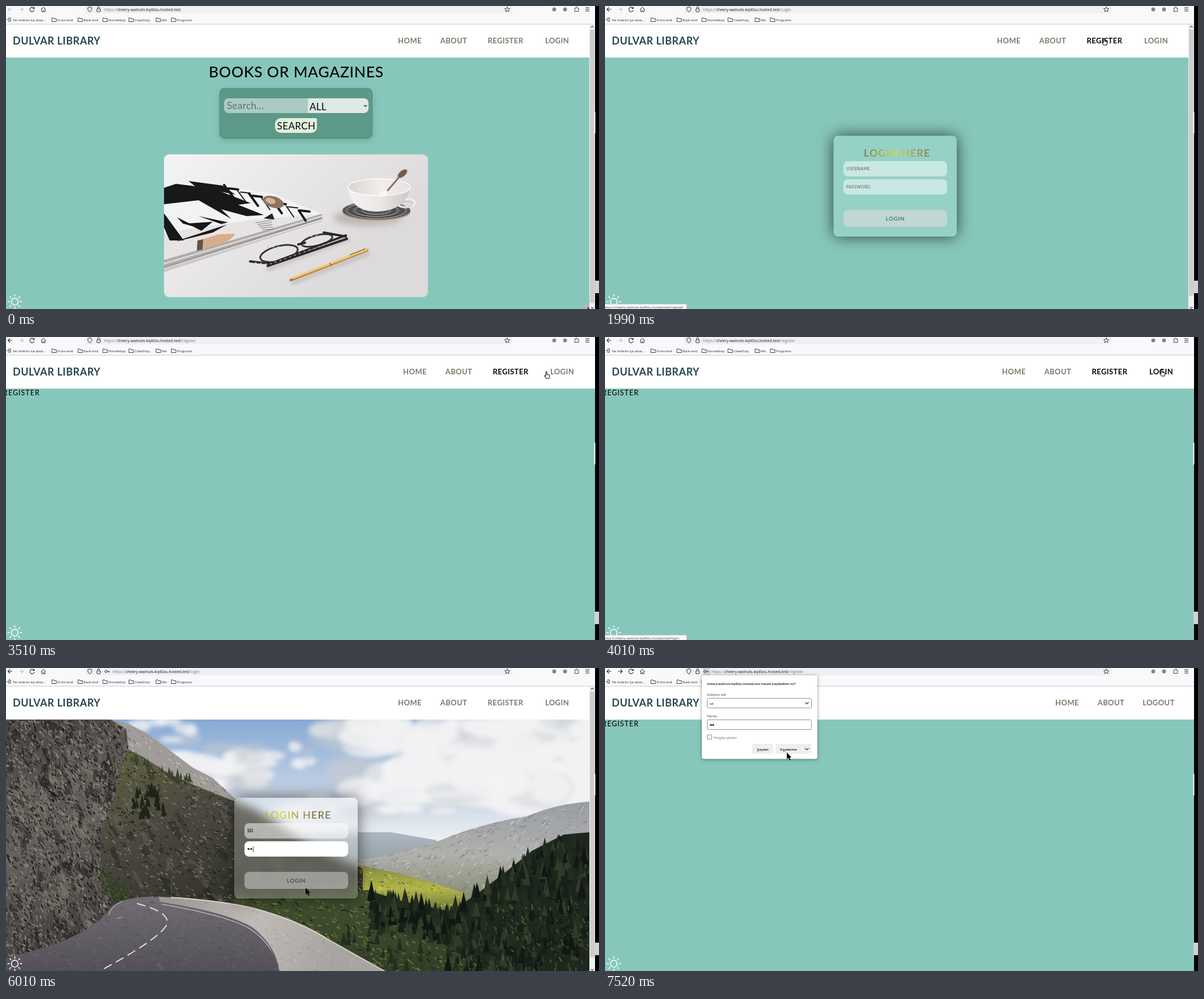
An HTML page with a canvas that plays this animation: 1047x535 px, repeating every 8000 ms.

```html
<!DOCTYPE html>
<html lang="en">
<head>
<meta charset="utf-8">
<title>Library site</title>
<style>
  html, body { margin: 0; width: 100%; height: 100%; overflow: hidden; background: #000; }
  canvas { display: block; }
</style>
</head>
<body>
<canvas id="stage" width="1047" height="535"></canvas>
<script>
const W = 1047, H = 535, LOOP = 8000;
const HOST = 'cheery-walnuts-kq40zu.hosted.test';
const TEAL = '#87c7bb', INK = '#2b2a33';
const stage = document.getElementById('stage').getContext('2d');
let g = stage;

// Each step: start time and the state of the screen from then on.
const steps = [
  [0, { page: 'home', corner: true }],
  [500, { page: 'home', arrow: [700, 89] }],
  [990, { page: 'home', active: 'HOME', hand: [712, 62] }],
  [1480, { page: 'home', active: 'HOME', bare: true, arrow: [830, 72] }],
  [1990, { page: 'login', path: '/Login', active: 'REGISTER', status: '/register', plain: true, hand: [882, 63] }],
  [2500, { page: 'login', path: '/Login', active: 'REGISTER', status: '/register', hand: [882, 63] }],
  [3000, { page: 'login', path: '/Login', active: 'REGISTER', status: '/register', click: [881, 57], hand: [882, 63] }],
  [3510, { page: 'register', path: '/register', active: 'REGISTER', bare: true, hand: [955, 67] }],
  [4010, { page: 'register', path: '/register', active: 'REGISTER LOGIN', status: '/login', bare: true, hand: [984, 63] }],
  [4500, { page: 'login', path: '/login', active: 'LOGIN', arrow: [725, 233] }],
  [5010, { page: 'login', path: '/login', focus: 'user', beam: [528, 290] }],
  [5500, { page: 'login', path: '/login', focus: 'user', user: 'SD', beam: [531, 324] }],
  [6010, { page: 'login', path: '/login', focus: 'pass', user: 'SD', pass: '••', key: true, arrow: [529, 388] }],
  [6510, { page: 'register', path: '/register', bare: true, member: true, key: true, arrow: [525, 377] }],
  [7010, { page: 'register', path: '/register', bare: true, member: true, key: true, popup: true, arrow: [472, 300] }],
  [7520, { page: 'register', path: '/register', bare: true, member: true, key: true, popup: true, arrow: [321, 149] }]
];

function box(x, y, w, h, fill, radius = 0, line) {
  g.beginPath();
  g.roundRect(x, y, w, h, radius);
  if (fill) { g.fillStyle = fill; g.fill(); }
  if (line) { g.strokeStyle = line; g.lineWidth = 1; g.stroke(); }
}
function shape(d, fill) {
  const p = new Path2D(d);
  g.fillStyle = fill;
  g.fill(p);
  return p;
}
function stroke(d, color, width = 1, dash = []) {
  g.strokeStyle = color;
  g.lineWidth = width;
  g.setLineDash(dash);
  g.stroke(new Path2D(d));
  g.setLineDash([]);
}
function oval(x, y, rx, ry, fill, line, width = 1, turn = 0) {
  g.beginPath();
  g.ellipse(x, y, rx, ry, turn, 0, 7);
  if (fill) { g.fillStyle = fill; g.fill(); }
  if (line) { g.strokeStyle = line; g.lineWidth = width; g.stroke(); }
}
function fade(x0, y0, x1, y1, ...colors) {
  const f = g.createLinearGradient(x0, y0, x1, y1);
  colors.forEach((c, i) => f.addColorStop(i / (colors.length - 1), c));
  return f;
}
function text(s, x, y, size, color, { weight = 400, family = 'Lato', gap = 0, align = 'left' } = {}) {
  g.font = `${weight} ${size}px ${family}, sans-serif`;
  g.letterSpacing = gap + 'px';
  g.textAlign = align;
  g.fillStyle = color;
  g.fillText(s, x, y);
  return x + g.measureText(s).width;
}
const ui = (s, x, y, size, color, more) => text(s, x, y, size, color, { family: '"Open Sans"', ...more });

let seed = 7;
const rnd = (a = 0, b = 1) => a + (b - a) * ((seed = seed * 16807 % 2147483647) / 2147483647);

// Paint once into a canvas of its own, kept inside the given frame.
function picture(frame, paint) {
  const c = document.createElement('canvas');
  c.width = W; c.height = H;
  g = c.getContext('2d');
  g.lineCap = 'round';
  g.beginPath();
  g.roundRect(...frame);
  g.clip();
  paint();
  g = stage;
  return c;
}
// Scatter short strokes inside a shape to give it a rough surface.
function rough(p, n, [x0, y0, x1, y1], colors, size, lean = 0.6) {
  g.save();
  g.clip(p);
  for (let i = 0; i < n; i++) {
    const x = rnd(x0, x1), y = rnd(y0, y1), l = rnd(1, size), a = lean + rnd(-0.6, 0.6);
    stroke(`M${x} ${y}l${l * Math.cos(a)} ${l * Math.sin(a)}`, colors[i % colors.length], rnd(0.6, size / 3));
  }
  g.restore();
}
function pine(x, y, h, color) {
  shape(`M${x} ${y - h}l${h * 0.22} ${h}h${-h * 0.44}z`, color);
}
function cloud(x, y, w, h, n) {
  g.filter = 'blur(4px)';
  for (let i = 0; i < n; i++) {
    oval(x + rnd(-w, w), y + rnd(-h, h), rnd(w / 8, w / 3), rnd(h / 5, h / 2), i % 4 ? '#f3f3f4cc' : '#c8ccd266');
  }
  g.filter = 'none';
}

const valley = picture([0, 91, 1030, 444], () => {
  box(0, 91, 1030, 444, fade(0, 91, 0, 300, '#86a9d4', '#b9cbe2', '#eceef0'));
  cloud(330, 175, 130, 36, 32);
  cloud(275, 110, 65, 22, 14);
  cloud(800, 165, 220, 75, 90);
  cloud(950, 120, 130, 40, 40);
  cloud(530, 150, 32, 20, 9);
  cloud(640, 245, 150, 18, 24);

  shape('M470 296L600 290L680 290L760 304V380H470z', fade(0, 290, 0, 360, '#aeb8c4', '#8c9896'));
  let p = shape('M620 340Q720 325 790 295Q860 270 920 262Q970 240 1030 236V440H740L620 380z',
    fade(0, 240, 0, 420, '#9b9ea5', '#b0b0ad', '#7e8667'));
  rough(p, 900, [620, 236, 1030, 420], ['#d3d2cf77', '#74797d77', '#8a907f77'], 9, 2.6);
  p = shape('M600 344Q700 360 810 398V445H600z', fade(0, 350, 0, 430, '#858c44', '#b3b549', '#66723a'));
  rough(p, 350, [600, 344, 810, 445], ['#d0ca58', '#5d6b31', '#8f9843'], 6, 0.3);

  p = shape('M180 91L215 98L250 116L290 146L330 176L365 194L412 238V300H180z', '#a09b98');
  rough(p, 500, [180, 91, 412, 280], ['#c2bdb9', '#7d7976', '#aaa5a1'], 7, 0.8);
  p = shape('M190 130L240 156L290 188L350 214L440 250L545 318L630 354V470H120V150z',
    fade(200, 150, 330, 430, '#5d603f', '#4a4740', '#34342c'));
  rough(p, 130, [160, 150, 620, 440], ['#6f6b6455', '#1d1f1a66'], 40, 0.9);
  rough(p, 3200, [150, 130, 630, 450], ['#858078', '#26281f', '#625f57', '#42452f', '#1d1f1a'], 6);
  rough(new Path2D('M215 148L330 198L450 252L545 318L520 322L420 268L340 228L225 172z'), 420, [210, 145, 545, 322],
    ['#a0a44b', '#6f7a36', '#3c4829'], 6, 0.4);
  rough(new Path2D('M430 335L630 354V450H440z'), 300, [430, 335, 630, 450], ['#68743a', '#8b8880', '#3f4a2c'], 7, 0.4);
  for (let i = 0; i < 45; i++) pine(rnd(222, 280), rnd(220, 268), rnd(8, 22), '#1d2419');
  for (let i = 0; i < 18; i++) { const x = rnd(215, 330); pine(x, 162 + (x - 215) * 0.36, rnd(8, 17), '#38442b'); }

  p = shape('M0 91H185L212 108L216 140L198 190L190 235L165 292L168 350L188 410L165 455L60 500L0 515z',
    fade(0, 91, 200, 480, '#46423f', '#66605c', '#3d3936'));
  rough(p, 190, [0, 91, 216, 510], ['#8b847d55', '#1c1a1977'], 45, 1.1);
  rough(p, 4200, [0, 91, 216, 510], ['#8f8882', '#2b2826', '#625c57', '#1d1b1a', '#756e69'], 7, 1);
  p = shape('M165 350Q195 375 225 398L200 416L170 400z', '#35422599');
  rough(p, 150, [165, 350, 225, 416], ['#56632f', '#222d1c'], 5);

  p = shape('M400 404L640 392L760 432L1030 460V535H430z', fade(0, 395, 0, 535, '#445130', '#313e27'));
  rough(p, 1300, [400, 392, 1030, 535], ['#5d7034', '#1b2418', '#3b4b2c', '#6f7c40'], 8, 0.5);
  p = shape('M1030 290L985 294L930 322L880 362L830 400L785 430L700 412L640 394L650 440L760 480L850 535H1030z', '#1e271d');
  for (let i = 0; i < 520; i++) {
    const x = rnd(640, 1040), left = x < 780;
    const top = left ? 404 + (x - 640) * 0.21 : Math.max(436 - (x - 780) * 0.68, 306);
    pine(x, top + 4 + rnd(0, left ? 55 : 215), rnd(14, 36), ['#171f18', '#232d1f', '#303c28', '#111813'][i % 4]);
  }
  rough(new Path2D('M870 420L1030 400V535H790z'), 420, [790, 400, 1030, 535], ['#4a5c30', '#33432688', '#141b13'], 8, 1.2);
  for (let i = 0; i < 25; i++) pine(rnd(575, 780), rnd(470, 535), rnd(10, 28), '#222e1d');

  p = shape('M205 411Q250 399 292 407Q390 428 430 454Q470 478 488 535H0V512L80 490Q155 463 180 430Q184 419 205 411z',
    fade(0, 405, 0, 535, '#726d73', '#625e65', '#545059'));
  rough(p, 900, [0, 405, 488, 535], ['#7d788055', '#45424855'], 7, 0);
  stroke('M488 535Q468 485 430 460Q390 437 275 417', '#d7d4d2', 1.2);
  stroke('M232 416Q286 430 285 450Q278 475 160 538', '#e3e0df', 2, [14, 10]);
  stroke('M205 412Q185 420 181 438M196 442L204 440', '#cbc8c6', 1);
  p = shape('M270 404L292 405Q390 412 440 425Q515 445 570 480L668 535H482Q475 490 435 459Q390 432 272 414z',
    fade(300, 405, 560, 535, '#9f9994', '#c0bbb6', '#a8a4a0'));
  rough(p, 300, [270, 404, 672, 535], ['#d6d1cb66', '#87817b55'], 7, 0.5);
  stroke('M292 405Q390 412 440 425Q515 445 570 480L668 535', '#d9d5d0', 2);
  stroke('M272 414Q390 432 435 459Q475 490 482 535', '#68636a', 2);
  stroke('M292 370V404', '#595e70', 1);
});

const desk = picture([279, 262, 466, 252, 9], () => {
  box(279, 262, 466, 252, fade(330, 262, 560, 514, '#f3f2f2', '#e7e5e5', '#dcdada'));
  shape('M279 440L558 372V380L279 470z', '#cecaca');
  shape('M279 329L330 309L470 331L558 367L279 452z', '#f4f3f3');
  shape('M279 405L558 367V376L279 462z', '#bfbbbb');
  shape('M279 400L440 377L558 367L279 448z', '#e6e3e3');
  for (let i = 0; i < 4; i++) stroke(`M279 ${451 + i * 4}L558 ${368 + i * 3}`, i % 2 ? '#f6f4f4' : '#928e8e', 1);
  stroke('M279 462L558 375', '#77716f', 1.2);
  const black = '#191818';
  shape('M279 321L300 314L365 322L432 348L410 351L455 369L425 371L380 359L398 376L340 343L279 350z', black);
  shape('M322 309L382 317L405 333L335 319z', black);
  shape('M279 366L314 414H289L279 391z', black);
  shape('M302 373L340 392L312 384zM340 371L392 382L380 385zM320 384L365 381L345 397z', black);
  shape('M316 410L390 386L365 400L300 416z', black);
  for (let i = 0; i < 7; i++) {
    const x = 385 + i * 22, y = 316 + i * 7.5;
    stroke(`M${x} ${y}l${18 - i} ${24 - i}m-10 -18l17 2`, black, i % 2 ? 2 : 4);
  }
  oval(472, 346, 19, 10, '#8e735d', null, 1, 0.3);
  oval(467, 344, 9, 5, '#d3b59a', null, 1, 0.3);
  shape('M340 414L375 403L404 402Q400 414 372 423L342 430z', '#d8ad8d');
  shape('M338 414L348 412L347 430L337 432z', '#625248');
  for (let i = 0; i < 5; i++) stroke(`M${441 + i * 3} ${383 + i * 3}l${27 - i * 2} ${-5 + i}`, '#777', 1);
  shape('M455 375L470 366L474 377z', '#242323');

  g.filter = 'blur(6px)';
  oval(638, 374, 60, 14, '#bcb7b5');
  g.filter = 'none';
  oval(654, 364, 60, 15, '#b99a7e');
  oval(654, 361, 60, 16, '#575557');
  for (let i = 1; i < 6; i++) oval(654, 361, 60 - i * 7, 16 - i * 1.8, null, i % 2 ? '#b5b2b2' : '#353435', 1);
  oval(707, 348, 15, 7, null, '#eeecec', 4, -0.1);
  oval(707, 350, 11, 5, null, '#b5b1b0', 1, -0.1);
  shape('M604 319Q607 362 652 363Q705 363 714 320z', fade(604, 0, 715, 0, '#f4f3f2', '#ebe8e6', '#cac6c3'));
  oval(659, 320, 55, 15, fade(605, 0, 714, 0, '#d8d4d0', '#f0eeeb', '#e6e2df'), '#fffefe', 1.5);
  stroke('M671 329L696 300', '#8b6e5f', 3);
  oval(700, 296, 10, 5, '#705c53', '#a58b7d', 1, -0.7);
  oval(666, 331, 9, 4, '#faf8f6', null, 1, -0.5);

  g.filter = 'blur(3px)';
  stroke('M462 465L604 412M506 489L640 437', '#bbb5b3', 5);
  g.filter = 'none';
  oval(482, 437, 34, 13, '#e5e3e399', '#353131', 3, -0.25);
  oval(549, 414, 28, 9, '#e5e3e399', '#353131', 3, -0.25);
  stroke('M431 451L466 455L600 405M516 421L528 418M462 459L602 411M561 400L600 407', '#29272a', 4);
  stroke('M440 453L465 456L600 408M462 426L495 424M530 409L552 404', '#c9bcad', 1.5, [2, 7]);
  stroke('M504 483L637 431', '#bd8843', 6);
  stroke('M504 481L637 430', '#edca85', 3.5);
  stroke('M501 485L506 482M572 454L574 459M608 439L634 429', '#946a35', 1.5);
});

function folder(x, name) {
  stroke(`M${x} 21h3l1 1.5h4v5h-8z`, INK, 0.9);
  ui(name, x + 10, 26.5, 6, INK);
}

function chrome(s) {
  box(0, 0, 1040, 32, '#f9f9fb');
  box(140, 0, 754, 13, '#f0f0f4', [0, 0, 3, 3]);
  box(0, 31.5, 1040, 1, '#cfcfd3');
  stroke('M11 6H3.5M7 2.5L3.5 6L7 9.5', s.path ? INK : '#c2c2c6', 1.1);
  stroke('M23 6H30.5M27 2.5L30.5 6L27 9.5', s.member ? INK : '#c2c2c6', 1.1);
  stroke('M49.5 4A4 4 0 1 0 50 7M50 1.5V4.5H47', INK, 1.1);
  stroke('M62 6L66 2L70 6M63 5V10H69V5M66 10V7', INK, 1);
  stroke('M144.5 3L148 1.5L151.5 3Q152 8 148 10.5Q144 8 144.5 3z', INK, 1);
  box(160.5, 5, 6, 5, null, 1, INK);
  stroke('M161.5 5V3.5A2 2 0 0 1 165.5 3.5V5', INK, 1);
  if (s.key) {
    if (s.member) box(173, 0, 13, 12.5, '#d4d4d9');
    oval(176.5, 6, 2, 2, null, INK);
    stroke('M178.5 6H183M182 6V8', INK, 1);
  }
  let x = ui('https://', s.key ? 188 : 173, 8.5, 6.9, '#77767e');
  x = ui(HOST, x, 8.5, 6.9, '#15141a');
  ui(s.path || '', x, 8.5, 6.9, '#77767e');
  stroke('M885 1.5L886.3 4.5L889.5 4.8L887.1 7L887.8 10L885 8.3L882.2 10L882.9 7L880.5 4.8L883.7 4.5z', INK, 0.9);
  oval(968, 6, 3.5, 3.5, '#85858c');
  oval(987, 6, 3.5, 3.5, '#85858c');
  stroke('M1004 4H1006V2.5Q1007.5 1 1009 2.5V4H1011V9.5H1004V7.5Q1006 6.5 1004 5.5z', INK, 0.9);
  stroke('M1023 3H1030M1023 6H1030M1023 9H1030', INK, 1);
  stroke('M4 21H8V27H4M1 24H6M4.5 22.5L6 24L4.5 25.5', INK, 0.9);
  ui('Yer imlerini içe aktar...', 12, 26.5, 5.7, INK);
  [[81, 'Front-end'], [127, 'Back-end'], [171, 'Norvekbay'], [217, 'CrewDuty'], [265, 'Me'], [292, 'Programs']]
    .forEach(f => folder(...f));
}

function header(s) {
  box(0, 32.5, 1040, 58.5, '#fff');
  text('DULVAR LIBRARY', 12, 67.5, 18, '#27474f', { weight: 700, gap: 0.5 });
  const links = s.member ? [['HOME', 807], ['ABOUT', 884.5], ['LOGOUT', 968.5]]
    : [['HOME', 713], ['ABOUT', 790.5], ['REGISTER', 882], ['LOGIN', 973]];
  for (const [name, x] of links) {
    const on = (s.active || '').split(' ').includes(name);
    text(name, x + (s.bare ? 9 : 0), 66, 13, on ? '#060606' : '#80776b', { weight: 700, gap: 0.4, align: 'center' });
  }
}

function home(s) {
  g.save();
  if (s.bare) g.translate(4.5, 0);
  text('BOOKS OR MAGAZINES', 512.5, 126, 26.5, '#060606', { weight: 500, gap: 0.7, align: 'center' });
  g.shadowColor = '#0003';
  g.shadowBlur = 12;
  g.shadowOffsetY = 3;
  box(377.5, 145.5, 269, 88, '#5c9989', 8);
  g.shadowColor = 'transparent';
  box(377.5, 145.5, 269, 88, null, 8, '#508777');
  box(385, 163, 148, 26, '#abcbc2', [8, 0, 0, 8]);
  box(533, 163, 107, 26, '#dde9e5', [0, 8, 8, 0]);
  text('Search...', 390, 182, 17, '#5c6f69', { gap: 0.4 });
  text('ALL', 536, 183.5, 17, '#060606', { gap: 0.2 });
  stroke('M632 175L634.5 177.5L637 175', '#111', 1.2);
  box(475, 198, 74, 26, '#e2f0dc', [10, 2, 10, 10]);
  text('SEARCH', 512.5, 218, 17, '#060606', { gap: 0.4, align: 'center' });
  if (!s.bare) g.drawImage(desk, 0, 0);
  g.restore();
}

function field(y, hint, value, focused) {
  box(421, y, 183, 27, focused ? '#fff' : '#ffffff80', 8);
  if (!value) text(hint, 426, y + 16, 7, '#0009', { gap: 0.5 });
  const end = value ? text(value, 426, y + 16, 7.5, '#111', { weight: 700, gap: 0.4 }) : 426;
  if (focused) box(end + 0.5, y + 9, 0.8, 10, '#111');
}

function login(s) {
  if (!s.plain) g.drawImage(valley, 0, 0);
  g.save();
  g.shadowColor = s.plain ? '#000a' : '#0009';
  g.shadowBlur = 28;
  box(403.5, 229, 217.5, 178, '#96d1c7', 8);
  g.restore();
  if (!s.plain) {
    g.save();
    g.beginPath();
    g.roundRect(403.5, 229, 217.5, 178, 8);
    g.clip();
    g.filter = 'blur(9px)';
    g.drawImage(valley, 0, 0);
    g.filter = 'none';
    box(403, 229, 218, 178, '#ffffff33');
    g.restore();
  }
  const mid = s.plain ? 515 : 485;
  text('LOGIN HERE', 457, 266, 18, fade(mid - 58, 0, mid + 58, 0, '#726f43', '#e5d62c', '#75713f'), { weight: 500, gap: 1.2 });
  field(274, 'USERNAME', s.user, s.focus === 'user');
  field(306, 'PASSWORD', s.pass, s.focus === 'pass');
  box(421, 360, 183, 30, s.plain ? '#dedcdc99' : '#dedcdc77', 8);
  text('LOGIN', 512.5, 378.5, 10, s.plain ? '#4d7f77' : '#50504d', { weight: 700, gap: 0.5, align: 'center' });
}

function popup() {
  g.save();
  g.shadowColor = '#0006';
  g.shadowBlur = 6;
  g.shadowOffsetY = 1;
  box(171, 13, 204, 147.5, '#fff', 4);
  g.restore();
  ui(HOST + ' hesabı kaydedilsin mi?', 180, 29.5, 5.6, '#15141a', { weight: 600 });
  ui('Kullanıcı adı', 180, 49, 6, INK);
  box(180.5, 53.5, 184, 17, '#fff', 2, '#8f8f9d');
  ui('sd', 185, 64.5, 6, '#15141a');
  stroke('M353.5 60.5L356.5 63.5L359.5 60.5', INK, 1.1);
  ui('Parola', 180, 87, 6, INK);
  box(180.5, 91.5, 184, 17, '#fff', 2, '#8f8f9d');
  oval(187, 100.5, 1.6, 1.6, '#15141a');
  oval(191, 100.5, 1.6, 1.6, '#15141a');
  box(180.5, 118, 8, 8, '#f3f3f5', 1, '#8f8f9d');
  ui('Parolayı göster', 192, 125, 5.9, '#5b5b66');
  box(202, 126, 3, 0.6, '#5b5b66');
  box(260, 134, 37, 17.5, '#eeeef2', 2);
  box(301, 134, 64, 17.5, '#eeeef2', 2);
  box(347, 134, 0.7, 17.5, '#fff');
  ui('Kaydet', 278.5, 145.5, 6, '#15141a', { weight: 600, align: 'center' });
  ui('Kaydetme', 324, 145.5, 6, '#15141a', { weight: 600, align: 'center' });
  box(268.5, 147, 3, 0.6, INK);
  box(314, 147, 3, 0.6, INK);
  stroke('M353.5 141.5L356.5 144.5L359.5 141.5', INK, 1.1);
}

function scrollbar(s) {
  box(1030, 33, 10, 502, '#f0f0f0');
  box(1031, 41.5, 8, s.page === 'home' ? 483 : 470, '#cdcdcd');
  stroke('M1032.5 38L1035 35.5L1037.5 38M1032.5 531.5L1035 534L1037.5 531.5', '#505050', 1.1);
}

function sun() {
  oval(15.5, 522, 6, 6, null, '#fff', 1.6);
  for (let i = 0; i < 8; i++) {
    const c = Math.cos(i * Math.PI / 4), n = Math.sin(i * Math.PI / 4);
    stroke(`M${15.5 + 9 * c} ${522 + 9 * n}L${15.5 + 13 * c} ${522 + 13 * n}`, '#fff', 1.6);
  }
}

function pointer(s) {
  if (s.click) oval(...s.click, 6.5, 6.5, '#f5e616');
  const [x, y] = s.arrow || s.hand || s.beam || [0, 0];
  if (s.arrow) shape(`M${x} ${y}v12l2.7 -2.4l2 4.4l2 -.9l-2 -4.2h3.6z`, '#000');
  if (s.beam) stroke(`M${x - 2} ${y - 6}h4M${x} ${y - 6}v12M${x - 2} ${y + 6}h4`, '#111', 1);
  if (s.hand) {
    const d = `M${x - 2} ${y - 5}q1 -1.5 2 0v4l4 1q1 .5 .7 2l-.8 4h-5l-3 -4q-.5 -1.8 2.1 -.5z`;
    shape(d, '#fff');
    stroke(d, '#111', 1.1);
  }
}

function draw(s) {
  box(0, 0, W, H, '#000');
  box(0, 0, 1040, H, TEAL);
  chrome(s);
  header(s);
  if (s.page === 'home') home(s);
  if (s.page === 'login') login(s);
  if (s.page === 'register') text('REGISTER', -5, 103, 12.5, '#0a0a0a', { weight: 500, gap: 1 });
  sun();
  if (!s.bare) scrollbar(s);
  if (s.status) {
    box(-1, 526.5, 145, 10, '#f9f9fb', 1, '#d0d0d4');
    ui('https://' + HOST + s.status, -3, 534, 6, '#45444c');
  }
  if (s.popup) popup();
  if (s.corner) {
    box(1018, 526, 12, 9, '#a8bcb7');
    shape('M1027 531v4h3z', '#000');
  }
  box(1040, 0, 7, H, '#000');
  box(1038.5, 187, 2, 38, '#fff');
  box(1039, 485, 8, 22, '#d2d2d2');
  pointer(s);
}

let shown;
function tick(now) {
  const t = now % LOOP;
  const state = steps.findLast(([start]) => t >= start)[1];
  if (state !== shown) draw(shown = state);
  requestAnimationFrame(tick);
}
tick(performance.now());
</script>
</body>
</html>
```
